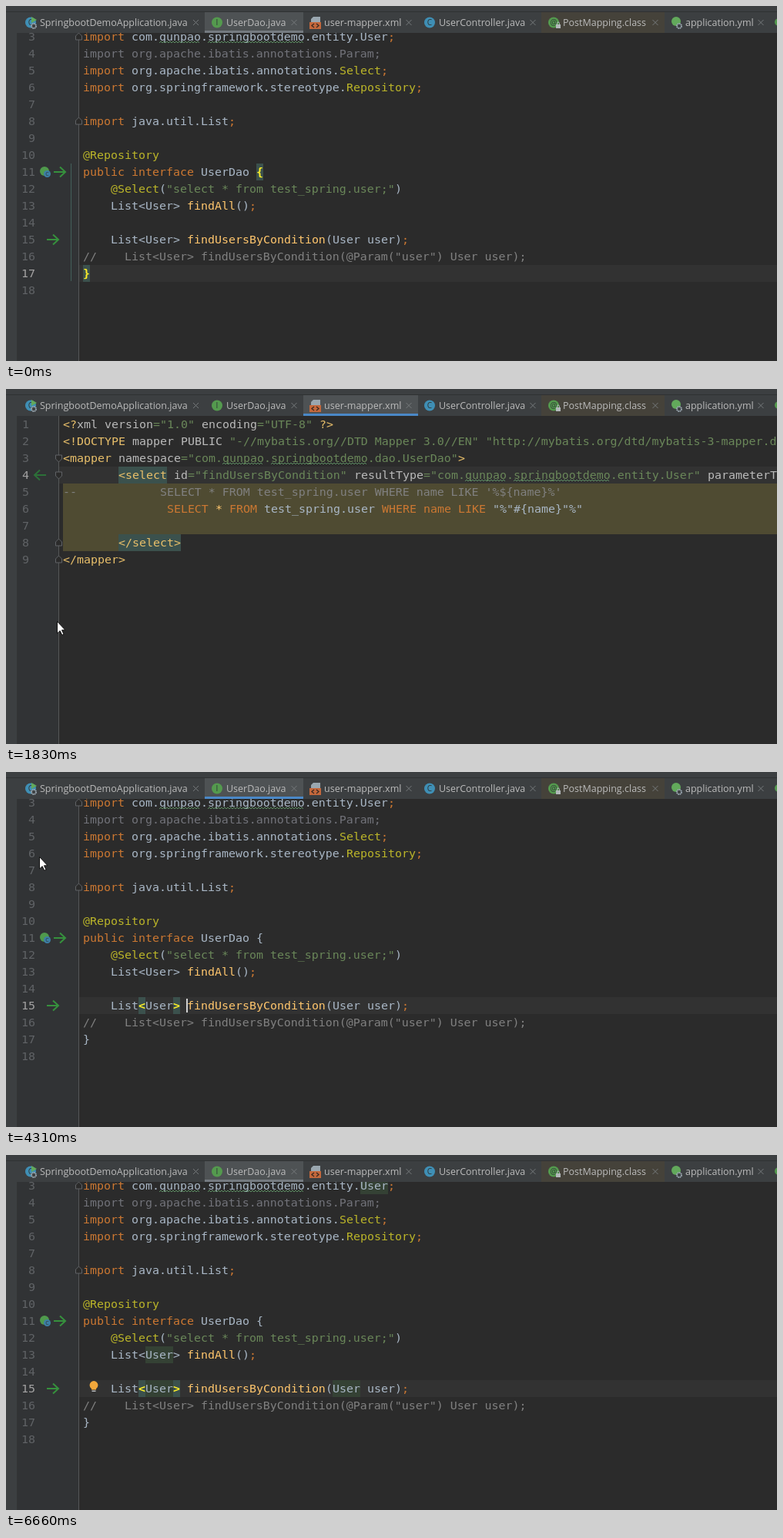
Animation of 1001x462 px, one loop 6740 ms. Source, as an HTML page:

```html
<!DOCTYPE html>
<html lang="en">
<head>
<meta charset="utf-8">
<title>Jumping between mapper and interface</title>
<style>
html, body { margin: 0; width: 100%; height: 100%; overflow: hidden; background: #2b2b2b; }
svg { display: block; }
text { white-space: pre; }
.code { font: 14.95px "DejaVu Sans Mono", monospace; }
.ui { font: 12.5px "Open Sans", sans-serif; fill: #bbb; }
.glyph { font: 10px "Open Sans", sans-serif; fill: #2e3436; text-anchor: middle; }
.p { fill: #a9b7c6; } .o { fill: #cc7832; } .y { fill: #bbb529; }
.f { fill: #ffc66d; } .s { fill: #6a8759; } .c { fill: #808080; }
.u { fill: #72737a; } .t { fill: #e8bf6a; } .a { fill: #bababa; }
.b { fill: #ffef28; font-weight: bold; }
.num { fill: #606366; text-anchor: end; } .now { fill: #a4a3a3; text-anchor: end; }
</style>
</head>
<body>
<svg id="stage" width="1001" height="462" viewBox="0 0 1001 462"></svg>
<script>
const LOOP = 6740, CH = 9, ROW = 22;
const TEAL = '#3b514d', MOSS = '#344134';
const stage = document.getElementById('stage');
const timed = [];

function add(parent, tag, attrs, text) {
  const el = document.createElementNS('http://www.w3.org/2000/svg', tag);
  for (const k in attrs) el.setAttribute(k, attrs[k]);
  if (text !== undefined) el.textContent = text;
  return parent.appendChild(el);
}
const rect = (g, x, y, width, height, fill) => add(g, 'rect', { x, y, width, height, fill });
const dot = (g, cx, cy, r, fill) => add(g, 'circle', { cx, cy, r, fill });
const line = (g, d, stroke, width = 1) =>
  add(g, 'path', { d, stroke, 'stroke-width': width, fill: 'none' });

// A group shown only inside the given [from, to) spans
function layer(parent, ...spans) {
  const el = add(parent, 'g', {});
  if (spans.length) timed.push({ el, spans });
  return el;
}

// An editor page: x of column 0, centre y of line 1, right edge of the numbers
function page(x, top, numX, spans) {
  const g = layer(stage, ...spans);
  const p = { g, x, numX, mid: n => top + (n - 1) * ROW, col: c => x + c * CH };
  rect(g, 15, 35, x - 21, 427, '#313335');
  line(g, `M${x - 5.5} 35V462`, '#555758');
  return p;
}
function write(p, n, src, g = p.g) {
  const el = add(g, 'text', { class: 'code', y: p.mid(n) + 5 });
  let c = 0;
  for (const part of src.split('~').slice(1)) {
    const s = part.slice(1);
    add(el, 'tspan', { class: part[0], x: p.col(c) }, s);
    c += s.length;
  }
}
function number(p, n, cls, g = p.g) {
  add(g, 'text', { class: 'code ' + cls, x: p.numX, y: p.mid(n) + 5 }, n);
}
function currentRow(p, n, ...spans) {
  const g = layer(p.g, ...spans);
  rect(g, p.x - 5, p.mid(n) - 11, 1001, ROW, '#323232');
  return () => {
    const top = layer(p.g, ...spans);
    rect(top, 17, p.mid(n) - 11, 22, ROW, '#313335');
    number(p, n, 'now', top);
  };
}
function mark(p, g, n, c, text, fill, cls) {
  rect(g, p.col(c), p.mid(n) - 11, text.length * CH, ROW, fill);
  add(g, 'text', { class: 'code ' + cls, x: p.col(c), y: p.mid(n) + 5 }, text);
}
function wave(p, n, c, len) {
  line(p.g, `M${p.col(c)} ${p.mid(n) + 8}` + 'l2 -2l2 2'.repeat(len * CH / 4), '#659c6b', .9);
}
function fold(p, n, up) {
  const s = up ? -1 : 1;
  add(p.g, 'path', {
    d: 'M-4 -4H4V1L0 5L-4 1Z', fill: '#2b2b2b', stroke: '#606366',
    transform: `translate(${p.x - 5.5} ${p.mid(n)}) scale(1 ${s})`
  });
}
function navArrow(g, x, y, dir, color) {
  add(g, 'path', {
    d: 'M-8 0H7M0 -6.5L7 0L0 6.5', fill: 'none', stroke: color, 'stroke-width': 2,
    transform: `translate(${x} ${y}) scale(${dir} 1)`
  });
}
function bulb(p, x, y, ...spans) {
  const g = layer(p.g, ...spans);
  dot(g, x, y, 5.4, '#f2a73b');
  rect(g, x - 3, y + 3, 6, 3, '#f2a73b');
  rect(g, x - 2.5, y + 7, 5, 1.5, '#b5b8ba');
}
function caret(p, n, c, ...spans) {
  rect(layer(p.g, ...spans), p.col(c) - 1, p.mid(n) - 9, 2, 18, '#d0d0d0');
}

rect(stage, 0, 0, 1001, 462, '#2b2b2b');

// Java interface
const dao = page(100, -4, 38, [[0, 1830], [4310, LOOP]]);
const daoNums = [currentRow(dao, 17, [0, 1680]), currentRow(dao, 15, [1680, LOOP])];
const javaLines = [
  '~oimport ~pcom.qunpao.springbootdemo.entity.User~o;',
  '~uimport org.apache.ibatis.annotations.Param;',
  '~oimport ~porg.apache.ibatis.annotations.~ySelect~o;',
  '~oimport ~porg.springframework.stereotype.~yRepository~o;',
  '',
  '~oimport ~pjava.util.List~o;',
  '',
  '~y@Repository',
  '~opublic interface ~pUserDao {',
  '~p    ~y@Select~p(~s"select * from test_spring.user;"~p)',
  '~p    List<User> ~ffindAll~p()~o;',
  '',
  '~p    List<User> ~ffindUsersByCondition~p(User user)~o;',
  '~c//    List<User> findUsersByCondition(@Param("user") User user);',
  '~p}',
  ''
];
const brace = layer(dao.g, [0, 1680]);
const angle = layer(dao.g, [4310, LOOP]);
const method = layer(dao.g, [4480, 5330]);
const users = layer(dao.g, [5330, LOOP]);
javaLines.forEach((s, i) => { write(dao, i + 3, s); number(dao, i + 3, 'num'); });
daoNums.forEach(show => show());
wave(dao, 3, 11, 6);
wave(dao, 3, 18, 14);
fold(dao, 3, true);
fold(dao, 8, true);
[brace, angle, method, users].forEach(g => dao.g.appendChild(g));
mark(dao, brace, 11, 25, '{', TEAL, 'b');
mark(dao, brace, 17, 0, '}', TEAL, 'b');
line(brace, 'M84.5 205V358', '#43605b');
mark(dao, angle, 15, 8, '<', TEAL, 'b');
mark(dao, angle, 15, 13, '>', TEAL, 'b');
mark(dao, method, 15, 15, 'findUsersByCondition', MOSS, 'f');
for (const [n, c] of [[3, 40], [13, 9], [15, 9], [15, 36]]) mark(dao, users, n, c, 'User', MOSS, 'p');
dot(dao.g, 50, 215, 6, '#4f9a4c');
dot(dao.g, 53.5, 218.5, 4.5, '#3d7fa6');
add(dao.g, 'text', { class: 'glyph', x: 53.5, y: 221, style: 'font-size:7px' }, 'C');
navArrow(dao.g, 70, 216, 1, '#36913d');
navArrow(dao.g, 61, 304, 1, '#36913d');
bulb(dao, 114, 299.5, [4940, 5330], [6190, LOOP]);
caret(dao, 15, 0, [1680, 1830]);
caret(dao, 15, 15, [4310, 5330]);
caret(dao, 15, 9, [5330, 6340]);

// XML mapper
const xml = page(74, 46, 30, [[1830, 4310]]);
const xmlNum = currentRow(xml, 4);
rect(xml.g, 74, 123, 927, 66, '#4f4b32');
rect(xml.g, 74, 189, 72, 22, '#4f4b32');
const xmlLines = [
  '~t<?~axml version~s="1.0"~a encoding~s="UTF-8" ~t?>',
  '~t<!DOCTYPE ~amapper PUBLIC ~s"-//mybatis.org//DTD Mapper 3.0//EN" "http://mybatis.org/dtd/mybatis-3-mapper.dtd"',
  '~t<mapper ~anamespace~s="com.qunpao.springbootdemo.dao.UserDao"~t>',
  '~t        <select ~aid~s="findUsersByCondition" ~aresultType~s="com.qunpao.springbootdemo.entity.User" ~aparameterType',
  "~c--            SELECT * FROM test_spring.user WHERE name LIKE '%${name}%'",
  '~o               SELECT ~f* ~oFROM ~ptest_spring.user ~oWHERE name LIKE ~p"%"#{name}"%"',
  '',
  '~t        </select>',
  '~t</mapper>'
];
xmlLines.forEach((s, i) => { write(xml, i + 1, s); number(xml, i + 1, 'num'); });
xmlNum();
for (const [n, c] of [[3, 23], [4, 58]]) {
  wave(xml, n, c, 6);
  wave(xml, n, c + 7, 14);
}
fold(xml, 3);
fold(xml, 4);
fold(xml, 8, true);
fold(xml, 9, true);
mark(xml, xml.g, 4, 8, '<select', TEAL, 't');
mark(xml, xml.g, 8, 8, '</select>', TEAL, 't');
const pair = layer(xml.g, [1910, 4310]);
mark(xml, pair, 4, 8, '<', TEAL, 'b');
mark(xml, pair, 8, 16, '>', TEAL, 'b');
line(pair, 'M58.5 101V211', '#43605b');
const tagName = layer(xml.g, [3460, 4310]);
mark(xml, tagName, 4, 9, 'select', MOSS, 't');
mark(xml, tagName, 8, 10, 'select', MOSS, 't');
navArrow(xml.g, 44, 112, -1, '#2c7138');
bulb(xml, 88, 107.5, [2990, 3460]);
caret(xml, 4, 8, [2460, 2960]);
caret(xml, 4, 9, [3460, 4310]);

// Window frame and tabs
const bar = layer(stage);
rect(bar, 0, 0, 15, 462, '#3c3f41');
rect(bar, 14, 35, 1, 427, '#323435');
rect(bar, 0, 0, 1001, 35, '#3c3f41');
rect(bar, 0, 7, 1001, 1, '#2f3132');
rect(bar, 695, 8, 160, 27, '#45423a');
function activeTab(x, w, color, ...spans) {
  const g = layer(bar, ...spans);
  rect(g, x, 8, w, 27, '#4e5254');
  rect(g, x, 32, w, 3, color);
}
activeTab(258, 128, '#747a80', [0, 1680], [6660, LOOP]);
activeTab(258, 128, '#4a88c7', [1680, 1830], [4310, 6660]);
activeTab(386, 149, '#4a88c7', [1830, 4310]);

function badge(x, color, letter) {
  dot(bar, x, 21.5, 7, color);
  add(bar, 'text', { class: 'glyph', x, y: 25 }, letter);
}
function gear(x, y) {
  add(bar, 'circle', {
    cx: x, cy: y, r: 3, fill: '#3c3f41', stroke: '#9aa7b0', 'stroke-width': 2, 'stroke-dasharray': '1.7 .6'
  });
}
badge(32, '#3f8fb5', 'C');
add(bar, 'path', { d: 'M33 14L40 18L33 22Z', fill: '#62a95b' });
gear(36, 26);
badge(274, '#549a4e', 'I');
add(bar, 'path', { d: 'M399 14H408V21H396V17Z', fill: '#9aa7b0' });
rect(bar, 394, 21, 15, 9, '#c4683c');
line(bar, 'M400 23L397 25.5L400 28M403 23L406 25.5L403 28', '#3a2a22', 1.3);
badge(550, '#3f8fb5', 'C');
badge(711, '#549a4e', '@');
rect(bar, 714, 24, 6, 5, '#b3b8bb');
line(bar, 'M715.5 24V22.5a1.5 1.5 0 0 1 3 0V24', '#b3b8bb');
dot(bar, 870, 20, 6, '#62a95b');
gear(874, 26);
dot(bar, 1003, 21, 5, '#549a4e');

const tabs = [
  [44, 'SpringbootDemoApplication.java', 246.5], [286, 'UserDao.java', 374],
  [413, 'user-mapper.xml', 523], [562, 'UserController.java', 684],
  [723, 'PostMapping.class', 843], [882, 'application.yml', 980]
];
for (const [x, name, close] of tabs) {
  add(bar, 'text', { class: 'ui', x, y: 26 }, name);
  line(bar, `M${close - 3.5} 18l7 7m0 -7l-7 7`, '#75797b');
}

// Pointer
const clicks = layer(stage, [1680, 1830], [3460, 3530], [4090, 4310], [5330, 5410]);
add(clicks, 'circle', { r: 12, fill: '#c9bd12', opacity: .76 });
const pointer = layer(stage, [130, 5870]);
const shapes = {
  arrow: add(pointer, 'path', {
    d: 'M.5 .5V16L4.2 12.7L6.8 18.3L9 17.2L6.5 11.8H11Z', fill: '#fff', stroke: '#111'
  }),
  hand: add(pointer, 'path', {
    d: 'M-1.5 13V3Q-1.5 1 0 1T1.7 3V8Q3.5 6.7 4.7 8.7Q6.5 7.7 7.6 9.6Q10.3 9 10.3 12V16Q10.3 18.5 8.5 20V22.5H0V20L-5 14.5Q-6 12.5-4.5 11.7Q-3 11.5-1.5 13Z',
    fill: '#fff', stroke: '#111'
  }),
  beam: add(pointer, 'path', {
    d: 'M-4 -7.5H-1.5L0 -6.5L1.5 -7.5H4M0 -7V7M-4 7.5H-1.5L0 6.5L1.5 7.5H4',
    fill: 'none', stroke: '#d8d8d8', 'stroke-width': 1.3
  })
};

// start, end, steps, control point, end point
const moves = [
  [130, 750, 9, 500, 430, 214, 363],
  [840, 1440, 9, 110, 345, 65, 307],
  [1520, 1680, 3, 66, 304, 66, 302],
  [2460, 3070, 9, 100, 375, 96, 127],
  [3150, 3380, 4, 130, 112, 152, 111],
  [3530, 3760, 4, 90, 110, 41, 113],
  [4010, 4160, 3, 42, 111, 43, 110],
  [4630, 5250, 9, 134, 292, 184, 309],
  [5330, 5330, 1, 184, 306, 183, 304],
  [5410, 5790, 6, 420, 350, 750, 453]
];
function pointerAt(t) {
  let x = 940, y = 472;
  for (const [from, to, steps, cx, cy, ex, ey] of moves) {
    if (t < from) break;
    const gap = (to - from) / Math.max(1, steps - 1) || 1;
    const k = Math.min(steps, Math.floor((t - from) / gap + .02) + 1) / steps, r = 1 - k;
    x = r * r * x + 2 * r * k * cx + k * k * ex;
    y = r * r * y + 2 * r * k * cy + k * k * ey;
  }
  return [x, y];
}
function pointerKind(x, y, inXml) {
  const [edge, ix, iy] = inXml ? [68, 44, 112] : [94, 61, 304];
  if (x >= edge) return 'beam';
  return Math.abs(x - ix) < 9 && Math.abs(y - iy) < 9 && !(inXml && x > 60) ? 'hand' : 'arrow';
}

function render(t) {
  for (const { el, spans } of timed) {
    el.style.display = spans.some(([a, b]) => t >= a && t < b) ? '' : 'none';
  }
  const [x, y] = pointerAt(t);
  const kind = pointerKind(x, y, t >= 1830 && t < 4310);
  const at = `translate(${Math.round(x)} ${Math.round(y)})`;
  pointer.setAttribute('transform', at);
  clicks.setAttribute('transform', at);
  for (const k in shapes) shapes[k].style.display = k === kind ? '' : 'none';
}
const begin = performance.now();
function tick() {
  render((performance.now() - begin) % LOOP);
  requestAnimationFrame(tick);
}
tick();
</script>
</body>
</html>
```
